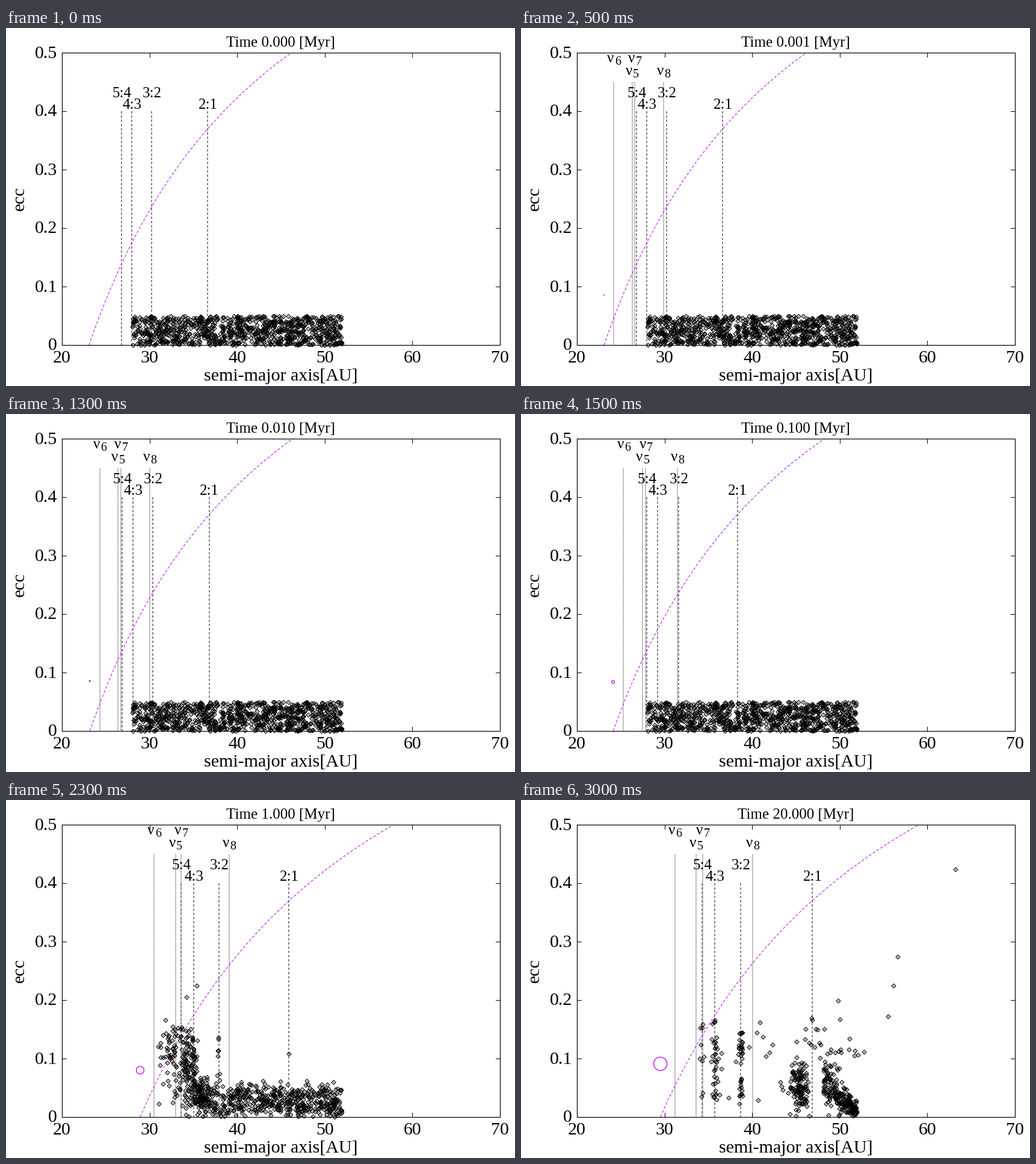
Write a matplotlib script that moves like this. It is 846 by 594 pixels and loops after 3.5 s.

```python
import numpy as np
import matplotlib.pyplot as plt
from matplotlib.animation import FuncAnimation

W, H, DPI = 846, 594, 72          # at 72 dpi one point is one pixel
LEFT, RIGHT, TOP, BOTTOM = 93, 821, 41, 526
PURPLE, GREY = "#c000ff", "#858585"
plt.rcParams["font.family"] = "Liberation Serif"

# snapshot times [Myr] with the planet's semi-major axis and eccentricity
TIMES = [0, 0.001, 0.01, 0.1, 1, 10, 20]
AXES = [23.09, 23.09, 23.18, 24.13, 28.93, 29.80, 29.52]
ECCS = [0.0855, 0.0855, 0.0855, 0.084, 0.080, 0.089, 0.091]

# name, period ratio, label baseline
RESONANCES = [("5:4", 5 / 4, 115), ("4:3", 4 / 3, 134),
              ("3:2", 3 / 2, 115), ("2:1", 2, 134)]
# index, place relative to the planet, drift per AU of migration, baseline
SECULAR = [("6", 1.048, 0.0013, 57), ("5", 1.139, 0, 78),
           ("7", 1.153, 0.0016, 57), ("8", 1.295, 0.0095, 78)]
NU5_JUMP = (10, 51.2)             # time and place of the displaced nu5


def px(a):
    return LEFT + (np.asarray(a) - 20) * (RIGHT - LEFT) / 50


def py(e):
    return BOTTOM - np.asarray(e) * (BOTTOM - TOP) / 0.5


def resonance(axis, ratio):
    return axis * ratio ** (2 / 3)


# ---- particles as (semi-major axis, eccentricity) rows ---------------------
rng = np.random.default_rng(4)


def box(n, a0, a1, e0, e1):
    return np.column_stack([rng.uniform(a0, a1, n), rng.uniform(e0, e1, n)])


def cloud(n, a, e, da, de):
    return np.column_stack([rng.normal(a, da, n), abs(rng.normal(e, de, n))])


def trapped(n, axis, ratio, e0, e1):
    """Column of particles held in a mean motion resonance."""
    a = rng.normal(resonance(axis, ratio), 0.15, n)
    return np.column_stack([a, rng.uniform(e0, e1, n)])


def strays(n, axis, a0, a1, e0, reach):
    """Scattered particles between e0 and a share of the crossing limit."""
    a = rng.uniform(a0, a1, n)
    top = np.maximum(e0, reach * (1 - axis / a))
    return np.column_stack([a, rng.uniform(e0, top)])


def excited(n, a0, a1):
    a = rng.uniform(a0, a1, n)
    return np.column_stack([a, 0.1 + np.minimum(rng.exponential(0.05, n), 0.19)])


def outer_belt(n, e):
    """Belt whose eccentricity falls with distance."""
    u = rng.uniform(0, 1, n)
    spread = rng.normal(0, 1, n) * (0.017 - 0.009 * u)
    return np.column_stack([48.1 + 3.9 * u, abs(e - 0.042 * u + spread) + 0.002])


def stirred(belt):
    kept = belt[(belt[:, 0] > 35.4) & (rng.random(len(belt)) < 0.82)]
    a, e = kept.T
    e = abs(0.029 + 0.78 * (e - 0.025) + rng.normal(0, 0.007, len(e)))
    return np.column_stack([a, e])


def at_1_myr(belt, axis):
    return np.vstack([
        stirred(belt), cloud(52, 32.6, 0.114, 0.9, 0.022),
        cloud(70, 34.2, 0.09, 0.35, 0.035), trapped(45, axis, 4 / 3, 0.02, 0.14),
        cloud(40, 35.6, 0.05, 0.7, 0.02), box(32, 33.8, 37, 0, 0.065),
        box(14, 31, 33.5, 0.015, 0.08), trapped(8, axis, 3 / 2, 0.06, 0.145),
        [(35.4, 0.225), (34.2, 0.205), (45.9, 0.108)]])


def at_10_myr(axis):
    return np.vstack([
        trapped(11, axis, 5 / 4, 0.08, 0.185), trapped(44, axis, 4 / 3, 0.04, 0.175),
        trapped(52, axis, 3 / 2, 0.035, 0.19), trapped(24, axis, 2, 0.01, 0.13),
        strays(46, axis, 34.5, 43, 0.05, 1), excited(32, 43.5, 51.5),
        cloud(34, 45, 0.088, 0.6, 0.02), cloud(122, 45.7, 0.033, 0.5, 0.013),
        box(14, 48, 51, 0.07, 0.11), outer_belt(200, 0.056),
        [(65, 0.465), (51.8, 0.352), (52.5, 0.248)]])


def at_20_myr(axis):
    return np.vstack([
        trapped(9, axis, 5 / 4, 0.035, 0.165), trapped(34, axis, 4 / 3, 0.02, 0.168),
        trapped(34, axis, 3 / 2, 0.02, 0.145), strays(20, axis, 36, 43.5, 0.025, 0.6),
        excited(29, 44.5, 52.8), cloud(98, 45.4, 0.051, 0.5, 0.018),
        cloud(18, 45.2, 0.082, 0.6, 0.014), box(14, 48, 50.2, 0.06, 0.095),
        outer_belt(195, 0.052),
        [(63.2, 0.424), (56.6, 0.274), (56.1, 0.225), (55.5, 0.172)]])


belt = box(940, 28, 52, 0, 0.05)
particles = [belt] * 4 + [at_1_myr(belt, AXES[4]),
                          at_10_myr(AXES[5]), at_20_myr(AXES[6])]

# ---- fixed parts ----------------------------------------------------------
fig = plt.figure(figsize=(W / DPI, H / DPI), dpi=DPI, facecolor="white")
ax = fig.add_axes([0, 0, 1, 1])
ax.set_xlim(0, W)
ax.set_ylim(H, 0)
ax.axis("off")


def line(xs=(), ys=(), **style):
    return ax.plot(xs, ys, **style)[0]


def text(x, y, s, size, ha="center", **kw):
    return ax.text(x, y, s, size=size, ha=ha, va="baseline", zorder=6, **kw)


line([LEFT, RIGHT, RIGHT, LEFT, LEFT], [TOP, TOP, BOTTOM, BOTTOM, TOP],
     color="black", lw=1.2, zorder=5)
for a in range(20, 71, 10):
    x = px(a)
    for y, d in ((TOP, 7), (BOTTOM, -7)):
        line([x, x], [y, y + d], color="black", lw=1, zorder=5)
    text(x, 555, str(a), 30)
for i in range(6):
    y = py(i / 10)
    for x, d in ((LEFT, 7), (RIGHT, -7)):
        line([x, x + d], [y, y], color="black", lw=1, zorder=5)
    text(85, y + 8.5, f"{i / 10:.1f}" if i else "0", 30, ha="right")
text(457, 585, "semi-major axis[AU]", 30)
text(30, 283, "ecc", 30, rotation=90, rotation_mode="anchor")

# ---- moving parts ---------------------------------------------------------
title = text(457, 31, "", 25)
curve = line(color=PURPLE, lw=1, ls=(0, (4.5, 3)), zorder=2)
planet = plt.Circle((0, 0), 1, fill=False, ec=PURPLE, lw=1.3, zorder=4)
ax.add_patch(planet)
diamonds = line(ls="", marker="D", ms=4.9, mfc="none", mec="black",
                mew=1.1, zorder=3)
cores = line(ls="", marker="o", ms=1.5, mfc="black", mew=0, zorder=3)

res_lines = [line(color=GREY, lw=2, ls=(0, (2, 1.5)), zorder=1)
             for _ in RESONANCES]
res_labels = [text(0, y, name, 25) for name, _, y in RESONANCES]
nu_lines = [line(color=GREY, lw=2, ls=(0, (0.5, 0.5)), zorder=1)
            for _ in SECULAR]
nu_labels = [(text(0, y, "ν", 25, ha="left"), text(0, y + 4, n, 20, ha="left"))
             for n, _, _, y in SECULAR]


def draw_planet(t, axis, ecc):
    e = np.linspace(0, 0.5, 120)
    curve.set_data(px(axis / (1 - e)), py(e))
    planet.set_visible(t > 0)
    planet.center = (px(axis), py(ecc))
    planet.set_radius(min(6.3 * t ** 0.42, 11.1))


def draw_resonances(axis):
    for (_, ratio, _), ln, label in zip(RESONANCES, res_lines, res_labels):
        x = float(px(resonance(axis, ratio)))
        ln.set_data([x, x], [py(0.4), BOTTOM])
        label.set_x(x + 0.5)


def draw_secular(t, axis):
    for (n, place, drift, _), ln, pair in zip(SECULAR, nu_lines, nu_labels):
        x = float(px(axis * (place + drift * (axis - AXES[0]))))
        jumped = n == "5" and t == NU5_JUMP[0]
        line_x = px(NU5_JUMP[1]) if jumped else x
        ln.set_data([line_x, line_x], [py(0.45), BOTTOM])
        pair[0].set_x(x - 11)
        pair[1].set_x(x + 1.5)
        for artist in (ln, *pair):
            artist.set_visible(t > 0)


def draw(i):
    t, axis = TIMES[i], AXES[i]
    title.set_text(f"Time {t:.3f} [Myr]")
    draw_planet(t, axis, ECCS[i])
    draw_resonances(axis)
    draw_secular(t, axis)
    a, e = particles[i].T
    for dots in (diamonds, cores):
        dots.set_data(px(a), py(e))
    return []


anim = FuncAnimation(fig, draw, frames=len(TIMES), interval=500,
                     init_func=lambda: draw(0), repeat=True, repeat_delay=0,
                     blit=False)
plt.show()
```
